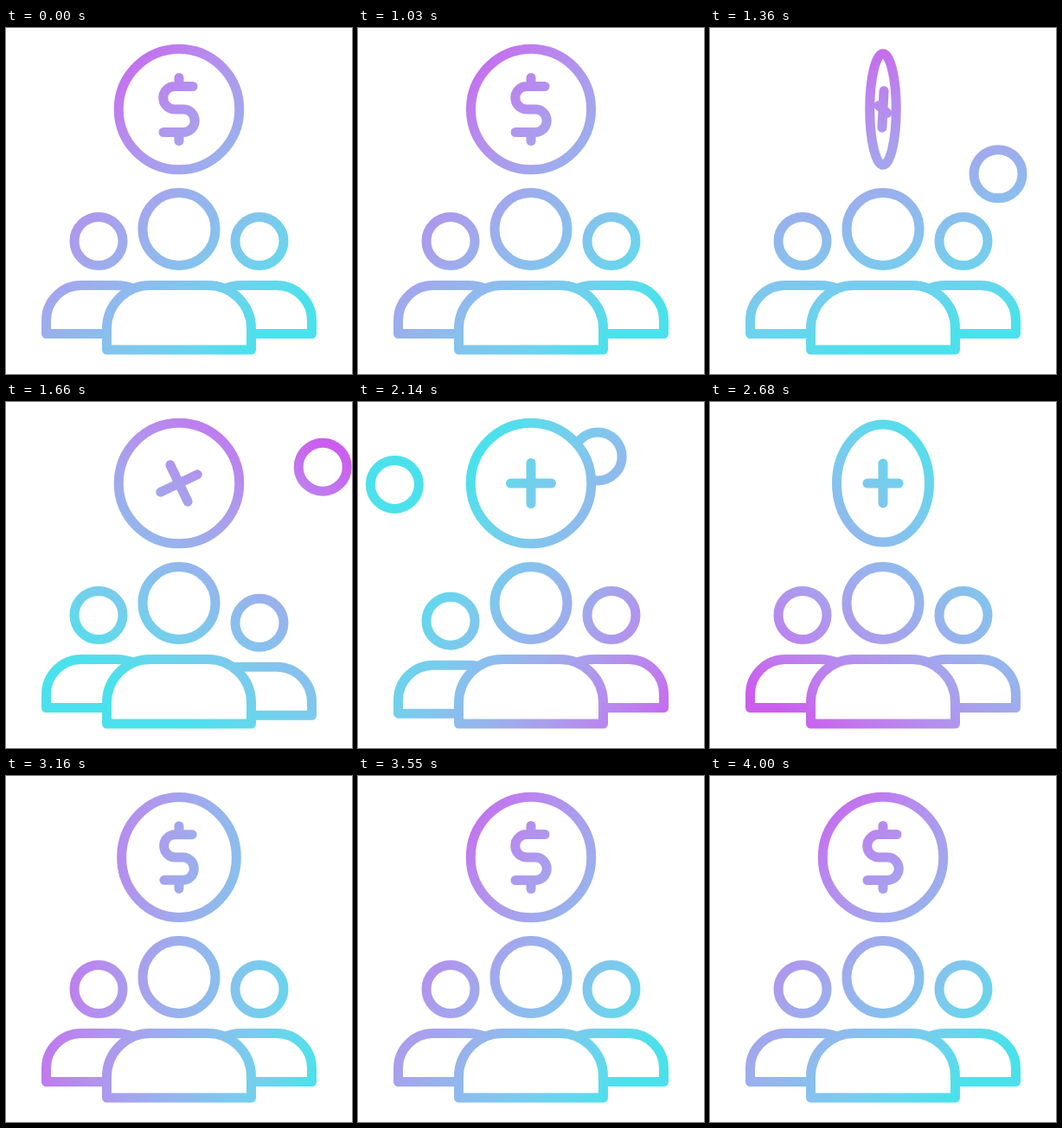
An HTML page with a canvas that plays this animation: 400x400 px, repeating every 4030 ms.

```html
<!DOCTYPE html>
<html lang="en">
<head>
<meta charset="utf-8">
<title>Crowdfunding icon</title>
<style>
  html, body { margin: 0; width: 100%; height: 100%; overflow: hidden; background: #fff; }
  canvas { display: block; width: 400px; height: 400px; }
</style>
</head>
<body>
<canvas id="stage" width="400" height="400"></canvas>
<script>
const ctx = document.getElementById('stage').getContext('2d');
const LOOP = 4030, HOLD = 1030, STEP = 30;
const PURPLE = [203, 94, 238], CYAN = [75, 225, 236];
const HEAD = 28, TAU = Math.PI * 2, QUARTER = Math.PI / 2;

const ramp = (t, from, to) => Math.min(1, Math.max(0, (t - from) / (to - from)));
const dip = (t, from) => 10 * Math.sin(Math.PI * ramp(t, from, from + 520));
const bezier = (u, a, b, c, d) =>
  a * (1 - u) ** 3 + 3 * b * u * (1 - u) ** 2 + 3 * c * u * u * (1 - u) + d * u ** 3;

// Blend in linear light, which keeps the middle of the gradient bright.
function blend(u) {
  const mix = PURPLE.map((p, i) =>
    Math.round((p ** 2.2 * (1 - u) + CYAN[i] ** 2.2 * u) ** (1 / 2.2)));
  return `rgb(${mix})`;
}

// One full clockwise turn about a point right of the middle.
function gradient(t) {
  const turn = 1 - (1 - ramp(t, 1000, 4000) ** 1.6) ** 2.6;
  const a = turn * TAU - Math.PI / 4;
  const dx = Math.sin(a), dy = -Math.cos(a);
  const g = ctx.createLinearGradient(230 + dx * 208, 208 + dy * 208, 230 - dx * 152, 208 - dy * 152);
  for (let u = 0; u <= 1; u += 0.125) g.addColorStop(u, blend(u));
  return g;
}

function ring(x, y, rx, ry = rx) {
  ctx.beginPath();
  ctx.ellipse(x, y, rx, ry, 0, 0, TAU);
  ctx.fill();
  ctx.stroke();
}

// The path is transformed, the line weight and gradient are not.
function strokeAt(x, y, sx, sy, path) {
  ctx.save();
  ctx.translate(x, y);
  ctx.scale(sx, sy);
  ctx.beginPath();
  path();
  ctx.restore();
  ctx.stroke();
}

function bodyPath() {
  ctx.moveTo(-84, 353.5);
  ctx.lineTo(-153.5, 353.5);
  ctx.arc(-113, 338, 40.5, Math.PI, 3 * QUARTER);
  ctx.lineTo(-73, 297.5);
  ctx.quadraticCurveTo(-61, 297.5, -52, 302);
}

// side: 1 draws the left person, -1 the mirrored right one
function person(side, drop) {
  ring(200 - 93 * side, 246.5 + drop, HEAD);
  strokeAt(200, drop, side, 1, bodyPath);
}

function leader() {
  ring(200, 232.5, 42);
  ctx.beginPath();
  ctx.moveTo(116.5, 372);
  ctx.arc(166.5, 347.5, 50, Math.PI, 3 * QUARTER);
  ctx.arc(233.5, 347.5, 50, -QUARTER, 0);
  ctx.lineTo(283.5, 372);
  ctx.closePath();
  ctx.fill();
  ctx.stroke();
}

function toss(u, xs, ys) {
  if (u > 0 && u < 1) ring(bezier(u, ...xs), bezier(u, ...ys), HEAD);
}

function dollarPath() {
  ctx.moveTo(16, -26.5);
  ctx.arc(-5, -13.25, 13.25, -QUARTER, QUARTER, true);
  ctx.arc(5, 13.25, 13.25, -QUARTER, QUARTER);
  ctx.lineTo(-18, 26.5);
  for (const s of [-1, 1]) {
    ctx.moveTo(0, 36.5 * s);
    ctx.lineTo(0, 26.5 * s);
  }
}

function plusPath(angle) {
  ctx.rotate(angle);
  ctx.moveTo(-23.5, 0);
  ctx.lineTo(23.5, 0);
  ctx.moveTo(0, -23.5);
  ctx.lineTo(0, 23.5);
}

function coin(t) {
  const face = Math.cos(Math.PI * (ramp(t, 1015, 1620) + ramp(t, 2523, 3231)));
  const sx = Math.max(0.01, Math.abs(face));
  const sy = 0.9 + 0.1 * sx;
  const spin = -QUARTER * (1 - ramp(t, 1310, 2058)) ** 2;
  ring(200, 94, 69.75 * sx, 69.75 * sy);
  strokeAt(200, 94, sx, sy, face >= 0 ? dollarPath : () => plusPath(spin));
}

function draw(t) {
  ctx.fillStyle = '#fff';
  ctx.fillRect(0, 0, 400, 400);
  ctx.strokeStyle = gradient(t);
  ctx.lineWidth = 11;
  ctx.lineCap = ctx.lineJoin = 'round';

  toss(ramp(t, 1180, 2247), [293, 382.5, 421.3, 225], [246.5, 80.6, -20.9, 90]);
  toss(ramp(t, 1820, 2620), [107, 24, -8, 175], [246.5, 97, -19, 90]);
  person(1, dip(t, 2020));
  person(-1, dip(t, 1480));
  leader();
  coin(t);
}

const start = performance.now();
function tick() {
  const t = (performance.now() - start) % LOOP;
  draw(t < HOLD ? 0 : HOLD + Math.floor((t - HOLD) / STEP) * STEP);
  requestAnimationFrame(tick);
}
tick();
</script>
</body>
</html>
```
